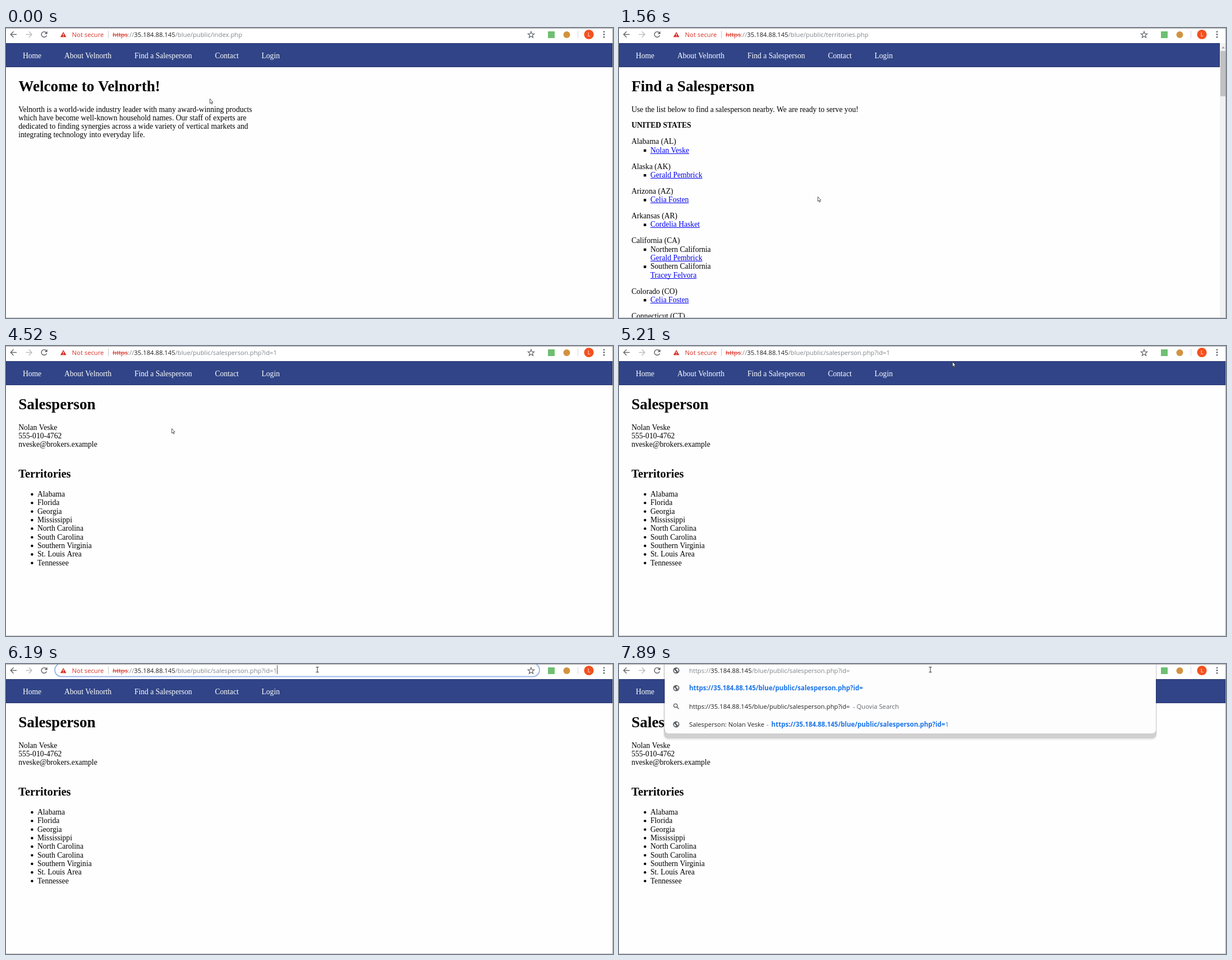
Write an HTML page with a canvas that moves like this. It is 1082 by 518 pixels and loops after 8 s.

```html
<!DOCTYPE html>
<html lang="en">
<head>
<meta charset="utf-8">
<title>Salesperson pages</title>
<style>
html, body { margin: 0; width: 100%; height: 100%; overflow: hidden; background: #fff; }
canvas { display: block; }
</style>
</head>
<body>
<canvas id="stage" width="1082" height="518"></canvas>
<script>
const ctx = document.getElementById('stage').getContext('2d');
const W = 1082, H = 518, LOOP = 8000;
const SERIF = '"Liberation Serif", serif', SANS = '"Open Sans", sans-serif';
const BODY = '13.6px ' + SERIF, BOLD = 'bold 13.6px ' + SERIF;
const H1 = 'bold 27.2px ' + SERIF, H2 = 'bold 20.4px ' + SERIF;
const UI = '11.25px ' + SANS, UI_BOLD = 'bold 11.5px ' + SANS;
const GREY = '#5f6368', PALE = '#80868b', DARK = '#202124', RED = '#d93025', BLUE = '#1a73e8', LINK = '#0000ee';
const LEFT = 22.2, INDENT = 56, TOP = 149.5, LINE = 15.33, GAP = 13.6;

const NAV = ['Home', 'About Velnorth', 'Find a Salesperson', 'Contact', 'Login'];
const INTRO = [
  'Velnorth is a world-wide industry leader with many award-winning products',
  'which have become well-known household names. Our staff of experts are',
  'dedicated to finding synergies across a wide variety of vertical markets and',
  'integrating technology into everyday life.'
];
const STATES = [
  ['Alabama (AL)', ['', 'Nolan Veske']],
  ['Alaska (AK)', ['', 'Gerald Pembrick']],
  ['Arizona (AZ)', ['', 'Celia Fosten']],
  ['Arkansas (AR)', ['', 'Cordelia Hasket']],
  ['California (CA)', ['Northern California', 'Gerald Pembrick'], ['Southern California', 'Tracey Felvora']],
  ['Colorado (CO)', ['', 'Celia Fosten']],
  ['Connecticut (CT)']
];
const CONTACT = ['Nolan Veske', '555-010-4762', 'nveske@brokers.example'];
const AREAS = ['Alabama', 'Florida', 'Georgia', 'Mississippi', 'North Carolina', 'South Carolina',
  'Southern Virginia', 'St. Louis Area', 'Tennessee'];
const HOST = '35.184.88.145', DIR = '/blue/public/';
const EDITED = 'https://' + HOST + DIR + 'salesperson.php?id=';

// Moments when the pages and the address bar change
const T = { list: 1250, person: 4090, focus: 5500, caret: 5630, select: 5780, unselect: 6190, erase: 7330, menu: 7460 };
const BLINK = 500;

// Pointer sweeps: each is a Bezier curve that starts where the one before ended
const START = [363, 126];
const SWEEPS = [
  { from: 150, to: 1130, bend: [[355, 165], [310, 80]], end: [294, 51] },
  { from: 1250, to: 1560, bend: [[314, 134], [334, 218]], end: [354, 301] },
  { from: 1870, to: 2890, bend: [[500, 240], [-60, 40]], end: [270, 54] },
  { from: 3010, to: 3940, bend: [[339, 80], [-40, 177]], end: [84, 217] },
  { from: 4090, to: 5210, bend: [[240, 180], [500, 60]], end: [594, 28] },
  { from: 5360, to: 5500, bend: [[581, 22], [568, 16]], end: [555, 10] }
];

let hits = [];

function box(x, y, w, h, color) {
  ctx.fillStyle = color;
  ctx.fillRect(x, y, w, h);
}

function disc(x, y, r, color) {
  ctx.fillStyle = color;
  ctx.beginPath();
  ctx.arc(x, y, r, 0, 7);
  ctx.fill();
}

function stroke(color, width, build) {
  ctx.strokeStyle = color;
  ctx.lineWidth = width;
  ctx.beginPath();
  build();
  ctx.stroke();
}

function line(color, width, ...pts) {
  stroke(color, width, () => pts.forEach(([x, y]) => ctx.lineTo(x, y)));
}

function shape(fill, edge, width, ...pts) {
  ctx.beginPath();
  pts.forEach(([x, y]) => ctx.lineTo(x, y));
  ctx.closePath();
  if (fill) { ctx.fillStyle = fill; ctx.fill(); }
  if (edge) { ctx.strokeStyle = edge; ctx.lineWidth = width; ctx.stroke(); }
}

function panel(x, y, w, h, r, color) {
  ctx.fillStyle = color;
  ctx.beginPath();
  ctx.roundRect(x, y, w, h, r);
  ctx.fill();
}

// Draws text, notes where it is for the pointer, and returns its width
function text(s, x, y, font = BODY, color = '#000', kind = 'beam') {
  ctx.font = font;
  ctx.fillStyle = color;
  ctx.fillText(s, x, y);
  const m = ctx.measureText(s);
  hits.push({ kind, x, w: m.width, top: y - m.fontBoundingBoxAscent - 3, bottom: y + m.fontBoundingBoxDescent + 3 });
  return m.width;
}

function rows(list, x, y) {
  list.forEach((s, i) => text(s, x, y + i * LINE));
}

function link(s, x, y) {
  const w = text(s, x, y, BODY, LINK, 'hand');
  box(x, Math.round(y + 1), w, 1, LINK);
}

function navBar(right) {
  box(0, 27, right, 43, '#26366f');
  box(1, 28, right - 2, 41, '#304487');
  let x = 29.9;
  for (const label of NAV) x += text(label, x, 54, BODY, '#fff', 'hand') + 40.8;
}

function homePage() {
  text('Welcome to Velnorth!', LEFT, 113, H1);
  rows(INTRO, LEFT, TOP);
}

function listPage() {
  text('Find a Salesperson', LEFT, 113, H1);
  text('Use the list below to find a salesperson nearby. We are ready to serve you!', LEFT, TOP);
  let y = TOP + LINE + GAP;
  text('UNITED STATES', LEFT, y, BOLD);
  for (const [state, ...entries] of STATES) {
    y += LINE + GAP;
    text(state, LEFT, y);
    for (const [area, name] of entries) {
      y += LINE;
      box(44, y - 6, 4.4, 4.4, '#000');
      if (area) {
        text(area, INDENT, y);
        y += LINE;
      }
      link(name, INDENT, y);
    }
  }
}

function scrollBar() {
  box(1071, 27, 11, H - 27, '#f1f1f1');
  shape('#a3a3a3', null, 0, [1074, 36.5], [1077, 33], [1080, 36.5]);
  box(1072, 41, 9, 81, '#c1c1c1');
}

function personPage() {
  text('Salesperson', LEFT, 113, H1);
  rows(CONTACT, LEFT, TOP);
  text('Territories', LEFT, 235, H2);
  rows(AREAS, INDENT, 269);
  AREAS.forEach((_, i) => disc(46.4, 265 + i * LINE, 2.2, '#000'));
}

function arrowIcon(x, dir, color) {
  line(color, 1.4, [x - 5 * dir, 11.5], [x + 5.5 * dir, 11.5]);
  line(color, 1.4, [x, 6.3], [x - 5.2 * dir, 11.5], [x, 16.7]);
}

function reloadIcon() {
  stroke(GREY, 1.5, () => ctx.arc(68, 11.5, 4.8, 0.35, 5.5));
  shape(GREY, null, 0, [73.7, 5.8], [73.7, 10.8], [68.7, 10.8]);
}

function warningIcon() {
  shape(RED, null, 0, [102.2, 7], [107.6, 16.3], [96.8, 16.3]);
  box(101.6, 10, 1.2, 3, '#fff');
  box(101.6, 14, 1.2, 1.2, '#fff');
}

function starIcon() {
  const pts = Array.from({ length: 10 }, (_, i) => {
    const a = i * Math.PI / 5 - Math.PI / 2, r = i % 2 ? 2.6 : 6;
    return [936 + r * Math.cos(a), 12.2 + r * Math.sin(a)];
  });
  shape(null, GREY, 1.2, ...pts);
}

function globeIcon(y) {
  disc(102, y, 5.6, GREY);
  shape('#fff', null, 0, [98, y - 1.5], [101.4, y + 1.5], [101.4, y + 4], [98.5, y + 2.5]);
  shape('#fff', null, 0, [101.5, y - 2], [104, y - 4], [106, y - 1], [105, y + 2.5], [103.5, y]);
}

function searchIcon(y) {
  stroke(GREY, 1.4, () => ctx.arc(100.8, y - 1.2, 3.2, 0, 7));
  line(GREY, 1.6, [103.2, y + 1.2], [106.8, y + 4.8]);
}

// Draws the address from x, then the caret if it is lit
function address(x, file, colors, lit) {
  const parts = ['https', '://', HOST, DIR + file];
  parts.forEach((s, i) => x += text(s, x, 16, UI, colors[i]));
  if (lit) box(Math.round(x + 0.5), 2, 1, 16, '#555');
}

function blink(t, since) {
  return Math.floor((t - since) / BLINK) % 2 === 0;
}

function secureBar(file, t) {
  const selected = t >= T.select && t < T.unselect;
  const lit = t >= T.caret && !selected && blink(t, t < T.unselect ? T.caret : T.unselect);
  const colors = selected ? Array(4).fill('#fff') : [RED, PALE, DARK, PALE];
  if (t >= T.focus) stroke('#9db7ea', 2, () => ctx.roundRect(87, -1, 864, 23.5, 11.7));
  warningIcon();
  text('Not secure', 117.6, 16, UI, RED);
  box(182, 5, 1, 13, '#c4c6c9');
  if (selected) box(190, 2, 295, 19, '#0078d7');
  address(190, file, colors, lit);
  box(190, 12, 27, 1, colors[0]);
  starIcon();
}

function editedBar(t) {
  globeIcon(11.5);
  address(125, 'salesperson.php?id=', [PALE, PALE, DARK, PALE], blink(t, T.erase));
}

function menu() {
  panel(79, -20, 880, 156, 9, 'rgba(0,0,0,.06)');
  panel(80, -20, 878, 153, 8, 'rgba(0,0,0,.13)');
  panel(81.5, -20, 875.5, 144, 7, '#fdfdfd');
  globeIcon(43);
  text(EDITED, 125, 47, UI_BOLD, BLUE);
  searchIcon(75.5);
  text(EDITED, 125, 79.5, UI, DARK);
  text('- Quovia Search', 417, 79.5, UI, GREY);
  globeIcon(107.8);
  text('Salesperson: Nolan Veske', 125, 112, UI, DARK);
  text('-', 263, 112, UI, GREY);
  const w = text(EDITED, 271.6, 112, UI_BOLD, BLUE);
  text('1', 271.6 + w, 112, UI, BLUE);
}

function toolbar(t) {
  arrowIcon(13.5, 1, GREY);
  arrowIcon(40.8, -1, '#b9bbbe');
  reloadIcon();
  if (t >= T.erase) editedBar(t);
  else secureBar(t < T.list ? 'index.php' : t < T.person ? 'territories.php' : 'salesperson.php?id=1', t);
  box(966, 6, 12, 12, '#6fbf73');
  disc(999.5, 12, 6, '#d2933f');
  box(1019, 5, 1, 13, '#d5d7da');
  disc(1039, 11.5, 8.6, '#f4511e');
  text('L', 1036.7, 15, '9.5px ' + SANS, '#fff');
  for (let i = -1; i <= 1; i++) disc(1066, 11.5 + i * 4.7, 1.4, GREY);
}

function bezier(a, b, c, d, u) {
  const v = 1 - u;
  return v * v * v * a + 3 * v * v * u * b + 3 * v * u * u * c + u * u * u * d;
}

function pointerAt(t) {
  const i = SWEEPS.findLastIndex(s => t >= s.from);
  if (i < 0) return START;
  const { from, to, bend: [b, c], end } = SWEEPS[i];
  const a = i ? SWEEPS[i - 1].end : START;
  const u = Math.min(1, (t - from) / (to - from));
  return [0, 1].map(k => Math.round(bezier(a[k], b[k], c[k], end[k], u)));
}

function pointerKind(x, y) {
  if (y < 22) return 'beam';
  const hit = hits.find(h => x >= h.x && x <= h.x + h.w && y >= h.top && y <= h.bottom);
  return hit ? hit.kind : 'arrow';
}

function pointer(t) {
  const [x, y] = pointerAt(t);
  const kind = pointerKind(x, y);
  ctx.save();
  ctx.translate(x, y);
  if (kind === 'beam') {
    for (const end of [-4.5, 4.5]) line('#333', 1, [-2.5, end], [2.5, end]);
    line('#333', 1, [0, -4.5], [0, 4.5]);
  } else if (kind === 'hand') {
    shape('#fff', '#333', 0.8, [-1, 0], [0.8, 0], [1, 3.5], [5.2, 4.5], [4.2, 10.5], [-0.5, 10.5], [-3.2, 6], [-1, 6.5]);
  } else {
    shape('#fff', '#40434a', 0.9, [0.5, 0.5], [0.5, 8.8], [2.4, 7.1], [3.7, 10], [4.9, 9.5], [3.7, 6.6], [6, 6.4]);
  }
  ctx.restore();
}

function draw(t) {
  const onList = t >= T.list && t < T.person;
  hits = [];
  box(0, 0, W, H, '#fefefe');
  box(0, 0, W, 27, '#fff');
  navBar(onList ? 1071 : W - 1);
  if (t < T.list) homePage();
  else if (onList) listPage();
  else personPage();
  if (onList) scrollBar();
  if (t >= T.menu) menu();
  toolbar(t);
  box(0, 0, W, 1, '#a3a3a3');
  box(W - 1, 0, 1, H, '#a3a3a3');
  box(0, H - 1, W, 1, '#c2c2c2');
  pointer(t);
}

const begin = performance.now();
function tick() {
  draw((performance.now() - begin) % LOOP);
  requestAnimationFrame(tick);
}
tick();
</script>
</body>
</html>
```
